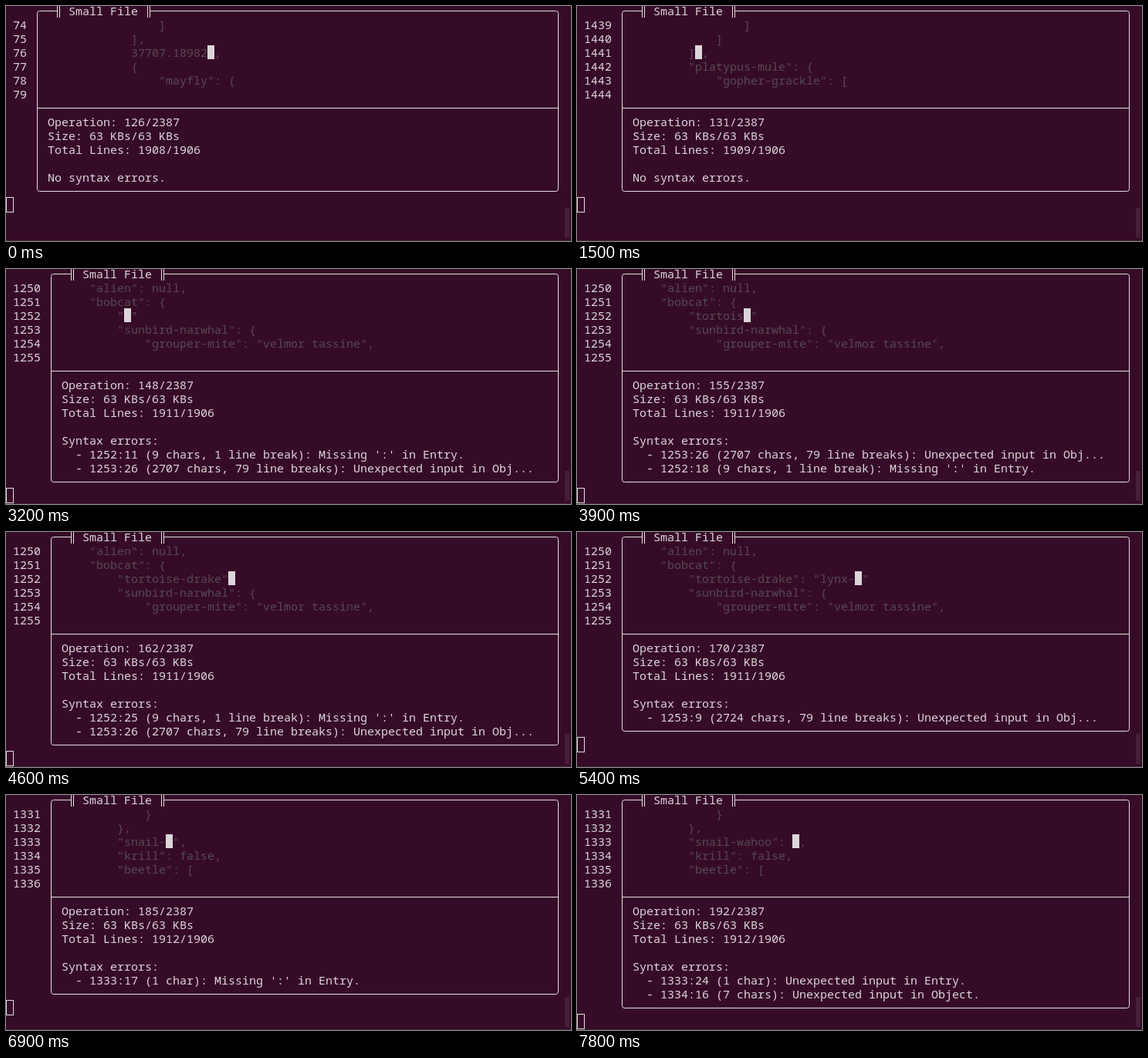
Write an HTML page with a canvas that moves like this. It is 732 px wide and 305 px high and loops after 8 s.

```html
<!DOCTYPE html>
<html lang="en">
<head>
<meta charset="utf-8">
<style>
  html, body { margin: 0; width: 100%; height: 100%; overflow: hidden; background: #360b28; }
  canvas { display: block; }
</style>
</head>
<body>
<canvas width="732" height="305"></canvas>
<script>
const ctx = document.querySelector('canvas').getContext('2d');
const CELL = 9, ROW = 18, LOOP = 8000;
const BG = '#360b28', FG = '#dcd6da', DIM = '#564b51', LINE = '#e4dfe2';
const pad = n => ' '.repeat(n);
const in8 = pad(8), in12 = pad(12), in16 = pad(16);

// The editing session: one view per operation
const views = {};
let op = 126, total = 1908, line, above, below;

function goTo(n, up, down) { line = n; above = up; below = down; }
function step(left, right, ...errors) {
  views[op++] = { line, above, below, left, right, errors, total };
}
function breakLine(text) {
  line++;
  total++;
  above = [above[1], text];
}
// Types a quoted word; the cursor leaves the quotes with the last letter
function typeWord(start, word, right, errorsAt) {
  for (let i = 0; i <= word.length; i++) {
    const end = i === word.length;
    step(start + '"' + word.slice(0, i) + (end ? '"' : ''), (end ? '' : '"') + right, ...errorsAt(i));
  }
}
// Adds a comma, a line break and the indent inside an object
function openEntry(text) {
  const missing = `${line}:11 (`, tail = 'Missing Entry in Object.';
  step(text, ',', `${missing}1 char): ${tail}`);
  breakLine(text);
  step('', ',', `${missing}1 char, 1 line break): ${tail}`);
  step(in8, ',', `${missing}9 chars, 1 line break): ${tail}`);
}
// Types a key and its colon in front of a comma
function typeKey(key, nextError) {
  typeWord(in8, key, ',', i => [`${line}:${11 + i} (1 char): Missing ':' in Entry.`]);
  for (const colon of [':', ': ']) {
    const left = `${in8}"${key}"${colon}`;
    step(left, ',', `${line}:${left.length + 1} (1 char): Unexpected input in Entry.`, nextError);
  }
}

const number = in12 + '37707.18982', inArray = '(1 char): Unexpected input in Array.';
goTo(76, [in16 + ']', in12 + '],'], [in12 + '{', in16 + '"mayfly": {']);
step(number, ',');
step(number + ',', ',', '76:25 ' + inArray);
breakLine(number + ',');
step('', ',', '77:1 ' + inArray);
step(in12, ',', '77:13 ' + inArray);
step(in12 + 'true', ',');

goTo(1441, [in16 + ']', in12 + ']'], [in8 + '"platypus-mule": {', in12 + '"gopher-grackle": [']);
step(in8 + ']', ',');
openEntry(in8 + '],');
typeKey('badger', '1443:24 (1184 chars, 36 line breaks): Unexpected input in Obj...');
step(in8 + '"badger": true', ',');

const rest = 'chars, 79 line breaks): Unexpected input in Obj...';
const afterKey = '1253:26 (2707 ' + rest, afterValue = '1253:9 (2724 ' + rest;
const bobcat = pad(4) + '"bobcat": {', drake = in8 + '"tortoise-drake"';
goTo(1251, [pad(4) + '},', pad(4) + '"alien": null,'],
  [in8 + '"sunbird-narwhal": {', in12 + '"grouper-mite": "velmor tassine",']);
step(bobcat, '');
breakLine(bobcat);
step('', '');
step(in8, '');
typeWord(in8, 'tortoise-drake', '',
  i => [`1252:${11 + i} (9 chars, 1 line break): Missing ':' in Entry.`, afterKey]);
step(drake + ':', '', afterKey);
step(drake + ': ', '', afterKey);
typeWord(drake + ': ', 'lynx-owl', '', () => [afterValue]);
step(drake + ': "lynx-owl",', '');

goTo(1332, [in16 + ']', in12 + '}'], [in8 + '"krill": false,', in8 + '"beetle": [']);
step(in8 + '}', ',');
openEntry(in8 + '},');
typeKey('snail-wahoo', '1334:16 (7 chars): Unexpected input in Object.');

function opAt(t) {
  if (t < 1500) return t < 100 ? 126 : t < 300 ? 127 : t < 500 ? 128 : 129;
  return t < 7800 ? Math.min(191, 131 + Math.floor((t - 1500) / 100)) : 192;
}

const rowTop = row => row * ROW - 3;
function write(str, col, row, color = FG) {
  ctx.fillStyle = color;
  ctx.fillText(str, col * CELL, rowTop(row) + 15);
}
function rect(x, y, w, h, color = LINE) {
  ctx.fillStyle = color;
  ctx.fillRect(x, y, w, h);
}

function drawBox(edge, lastRow) {
  const x = edge * CELL + 4;
  ctx.strokeStyle = LINE;
  ctx.lineWidth = 1;
  ctx.beginPath();
  ctx.roundRect(x + 0.5, 6.5, 715 - x, lastRow * ROW, 3);
  ctx.stroke();
  rect(x, 132, 716 - x, 1);
  rect(x + 26, 0, 121, 15, BG);
  for (const dx of [26, 29, 143, 146]) rect(x + dx, 0, 1, 15);
  write('Small File', edge + 5, 0);
}

function draw(n) {
  const v = views[n], edge = String(v.line).length + 2, col = edge + 2;
  rect(0, 0, 732, 305, BG);
  rect(724, 262, 6, 39, '#432037');
  rect(0, 304, 732, 1, '#3c2535');

  const errors = n % 2 ? [...v.errors].reverse() : v.errors;
  const lastRow = 13 + errors.length;
  drawBox(edge, lastRow);

  for (let i = 0; i < 6; i++) write(v.line - 2 + i, 1, i + 1);
  [...v.above, v.left, ...v.below].forEach((s, i) => write(s, col, i + 1, DIM));
  const cursor = col + v.left.length;
  write(v.right, cursor + 1, 3, DIM);
  rect(cursor * CELL, rowTop(3), CELL, ROW, FG);

  write(`Operation: ${n}/2387`, col, 8);
  write('Size: 63 KBs/63 KBs', col, 9);
  write(`Total Lines: ${v.total}/1906`, col, 10);
  write(errors.length ? 'Syntax errors:' : 'No syntax errors.', col, 12);
  errors.forEach((e, i) => write('  - ' + e, col, 13 + i));

  ctx.strokeStyle = LINE;
  ctx.strokeRect(0.5, rowTop(lastRow + 1) - 0.5, 9, 19);
}

function frame() {
  ctx.font = '15px "Noto Sans Mono", "DejaVu Sans Mono", monospace';
  draw(opAt(performance.now() % LOOP));
  requestAnimationFrame(frame);
}
frame();
</script>
</body>
</html>
```
